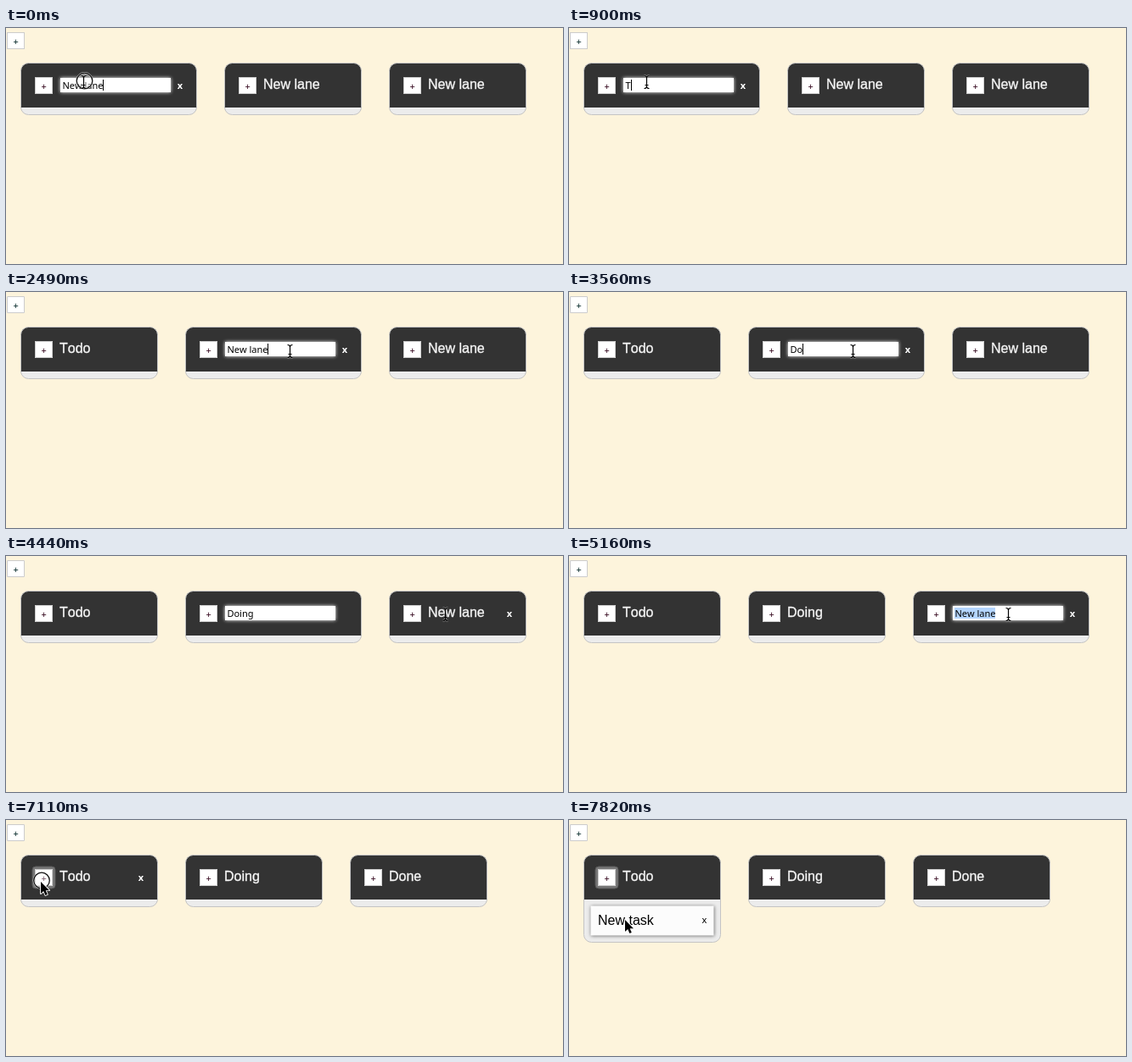
Write an HTML page with a canvas that moves like this. It is 656 by 279 pixels and loops after 7990 ms.

```html
<!DOCTYPE html>
<html lang="en">
<head>
<meta charset="utf-8">
<title>Lanes board</title>
<style>
html, body { margin: 0; width: 100%; height: 100%; overflow: hidden; background: #fdf4dc; }
canvas { display: block; width: 656px; height: 279px; }
</style>
</head>
<body>
<canvas id="stage"></canvas>
<script>
const W = 656, H = 279, LOOP = 7990, BLINK = 485;
const SANS = '"Liberation Sans", Arial, sans-serif';
const UI = '"Noto Sans", "Open Sans", sans-serif';
const canvas = document.getElementById('stage');
const ctx = canvas.getContext('2d');
const ratio = window.devicePixelRatio || 1;
canvas.width = W * ratio;
canvas.height = H * ratio;
ctx.scale(ratio, ratio);
ctx.fontKerning = 'none';

// [time, lane being edited]; -1 means none
const edits = [[0, 0], [2400, -1], [2490, 1], [4710, 2], [7110, -1]];

// [time, text, selected] for each lane
const typing = [
  [[90, 'New lane'], [540, 'New lane', true], [900, 'T'], [1080, 'To'], [1250, 'Todo']],
  [[2455, 'New lane'], [3020, 'New lane', true], [3290, 'D'], [3560, 'Do'], [3650, 'Doi'],
   [3740, 'Doin'], [3830, 'Doing']],
  [[4710, 'New lane'], [5160, 'New lane', true], [5430, 'D'], [5700, 'Do'], [5790, 'Don'], [5870, 'Done']]
];

// pointer moves: start, last step, step count, end point, bow of the path
const moves = [
  { from: 1610, to: 2220, steps: 8, x: 334.5, y: 70, bow: -13 },
  { from: 4090, to: 4440, steps: 5, x: 517.5, y: 69, bow: -3 },
  { from: 6140, to: 6310, steps: 3, x: 85.5, y: 63.5, bow: 0 },
  { from: 6400, to: 6660, steps: 4, x: 42, y: 74, bow: 0 },
  { from: 6930, to: 6930, steps: 1, x: 41, y: 73, bow: 0 },
  { from: 7470, to: 7820, steps: 5, x: 66, y: 118, bow: 0 }
];
const clicks = [0, 2400, 4710, 7110];
const TASK_AT = 7200, FOCUS_AT = 7110;

const latest = (list, t) => list.reduce((hit, e) => e[0] <= t ? e : hit, list[0]);
const inside = (p, x, y, w, h) => p.x >= x && p.x < x + w && p.y >= y && p.y < y + h;

function pointerAt(t) {
  let p = { x: 91.5, y: 64 };
  for (const m of moves) {
    if (t < m.from) break;
    const gap = (m.to - m.from) / Math.max(1, m.steps - 1) || 1;
    const k = Math.min(1, (Math.floor((t - m.from) / gap + 0.03) + 1) / m.steps);
    const e = k * k * (3 - 2 * k);
    p = {
      x: p.x + (m.x - p.x) * e,
      y: p.y + (m.y - p.y) * e + m.bow * Math.sin(Math.PI * e)
    };
  }
  return p;
}

function text(str, x, y, font, color, align = 'left', weight = 0) {
  ctx.font = font;
  ctx.textAlign = align;
  ctx.fillStyle = color;
  ctx.fillText(str, x, y);
  if (weight) {
    ctx.strokeStyle = color;
    ctx.lineWidth = weight;
    ctx.strokeText(str, x, y);
  }
}

function round(x, y, w, h, r) {
  ctx.beginPath();
  ctx.roundRect(x, y, w, h, r);
}

function glowRect(x, y, w, h, fill, glow, blur) {
  ctx.save();
  ctx.shadowColor = glow;
  ctx.shadowBlur = blur * ratio;
  ctx.fillStyle = fill;
  ctx.fillRect(x, y, w, h);
  ctx.restore();
}

function button(x, y, color, focused) {
  if (focused) {
    round(x - 3, y - 3, 27, 26, 4);
    ctx.fillStyle = '#777';
    ctx.fill();
    ctx.strokeStyle = '#5a5a5a';
    ctx.lineWidth = 1;
    ctx.stroke();
  }
  ctx.fillStyle = '#fff';
  ctx.fillRect(x, y, 21, 20);
  ctx.strokeStyle = '#ccc';
  ctx.lineWidth = 1;
  ctx.strokeRect(x + 0.5, y + 0.5, 20, 19);
  text('+', x + 10.7, y + 14.5, '11px ' + UI, color, 'center');
}

function field(x, key, t) {
  const [since, value, selected] = key;
  glowRect(x + 47, 59, 130, 17, '#fff', '#fff', 4);
  ctx.font = '11px ' + UI;
  const left = x + 49.4;
  const end = Math.round(left + ctx.measureText(value).width);
  if (selected) {
    ctx.fillStyle = '#b4d5fe';
    ctx.fillRect(x + 49, 61, end - x - 49, 13);
  }
  text(value, left, 72, '11px ' + UI, '#000');
  const on = Math.floor(Math.max(0, t - since) / BLINK) % 2 === 0;
  if (on && !selected) {
    ctx.fillStyle = '#000';
    ctx.fillRect(end, 61, 1, 13);
  }
}

function card(x, p) {
  const hover = inside(p, x, 101, 145, 36);
  glowRect(x, 101.5, 145, 35, '#fcfcfc', hover ? '#666' : '#aaa', hover ? 4 : 2);
  text('New task', x + 8.5, 124, '16px ' + SANS, '#000');
  if (hover) text('x', x + 134, 122, '11px ' + UI, '#000', 'center');
}

function lane(i, x, w, editing, t, p) {
  const hasTask = i === 0 && t >= TASK_AT;
  const h = hasTask ? 104 : 62;
  round(x + 0.5, 41.5, w - 1, h - 1, 9);
  ctx.fillStyle = '#ececec';
  ctx.fill();
  ctx.save();
  ctx.clip();
  ctx.fillStyle = '#333';
  ctx.fillRect(x, 41, w, 53);
  ctx.restore();
  round(x + 0.5, 41.5, w - 1, h - 1, 9);
  ctx.strokeStyle = '#c4c4c4';
  ctx.lineWidth = 1;
  ctx.stroke();

  button(x + 17, 58, '#300018', i === 0 && t >= FOCUS_AT);
  const key = latest(typing[i], t);
  if (editing) field(x, key, t);
  else text(key[1], x + 46, 72, '16px ' + SANS, '#f6f6f6', 'left', 0.35);
  if (inside(p, x, 41, w, 53)) {
    text('x', x + w - 20, 72, 'bold 11px ' + UI, '#fff', 'center');
  }
  if (hasTask) card(x + 8.5, p);
}

function clickRing(p) {
  ctx.beginPath();
  ctx.arc(p.x + 1, p.y - 1.5, 9.3, 0, 2 * Math.PI);
  ctx.fillStyle = 'rgba(255,255,255,0.35)';
  ctx.fill();
  ctx.strokeStyle = 'rgba(255,255,255,0.8)';
  ctx.lineWidth = 2.2;
  ctx.stroke();
  ctx.strokeStyle = '#111';
  ctx.lineWidth = 1.3;
  ctx.stroke();
}

function beam(p) {
  const x = Math.floor(p.x) + 0.5, y = Math.round(p.y);
  ctx.beginPath();
  for (const s of [-1, 1]) {
    ctx.moveTo(x - 3, y + s * 7.5);
    ctx.quadraticCurveTo(x, y + s * 7.5, x, y + s * 5);
    ctx.quadraticCurveTo(x, y + s * 7.5, x + 3, y + s * 7.5);
  }
  ctx.moveTo(x, y - 6);
  ctx.lineTo(x, y + 6);
  ctx.moveTo(x - 2, y + 3.5);
  ctx.lineTo(x + 2, y + 3.5);
  ctx.strokeStyle = 'rgba(255,255,255,0.4)';
  ctx.lineWidth = 2.6;
  ctx.stroke();
  ctx.strokeStyle = '#000';
  ctx.lineWidth = 1.2;
  ctx.stroke();
}

function arrow(p) {
  const shape = [[0, 0], [0, 14], [3.2, 11], [5.4, 16], [7.8, 15], [5.7, 10.2], [10, 10.2]];
  ctx.beginPath();
  for (const [dx, dy] of shape) ctx.lineTo(p.x + dx, p.y + dy);
  ctx.closePath();
  ctx.strokeStyle = '#fff';
  ctx.lineWidth = 1.8;
  ctx.lineJoin = 'round';
  ctx.stroke();
  ctx.fillStyle = '#000';
  ctx.fill();
}

function draw(t) {
  const p = pointerAt(t);
  const active = latest(edits, t)[1];
  ctx.fillStyle = '#fdf4dc';
  ctx.fillRect(0, 0, W, H);
  button(1, 5, '#002424', false);

  let x = 17, overText = false;
  for (let i = 0; i < 3; i++) {
    const w = i === active ? 208 : 162;
    lane(i, x, w, i === active, t, p);
    overText = overText || inside(p, x + 46, 50, w - 76, 32);
    x += w + 32;
  }
  if (clicks.some(c => t >= c && t < c + 90)) clickRing(p);
  (overText ? beam : arrow)(p);
}

const start = performance.now();
function tick() {
  draw((performance.now() - start) % LOOP);
  requestAnimationFrame(tick);
}
tick();
</script>
</body>
</html>
```
